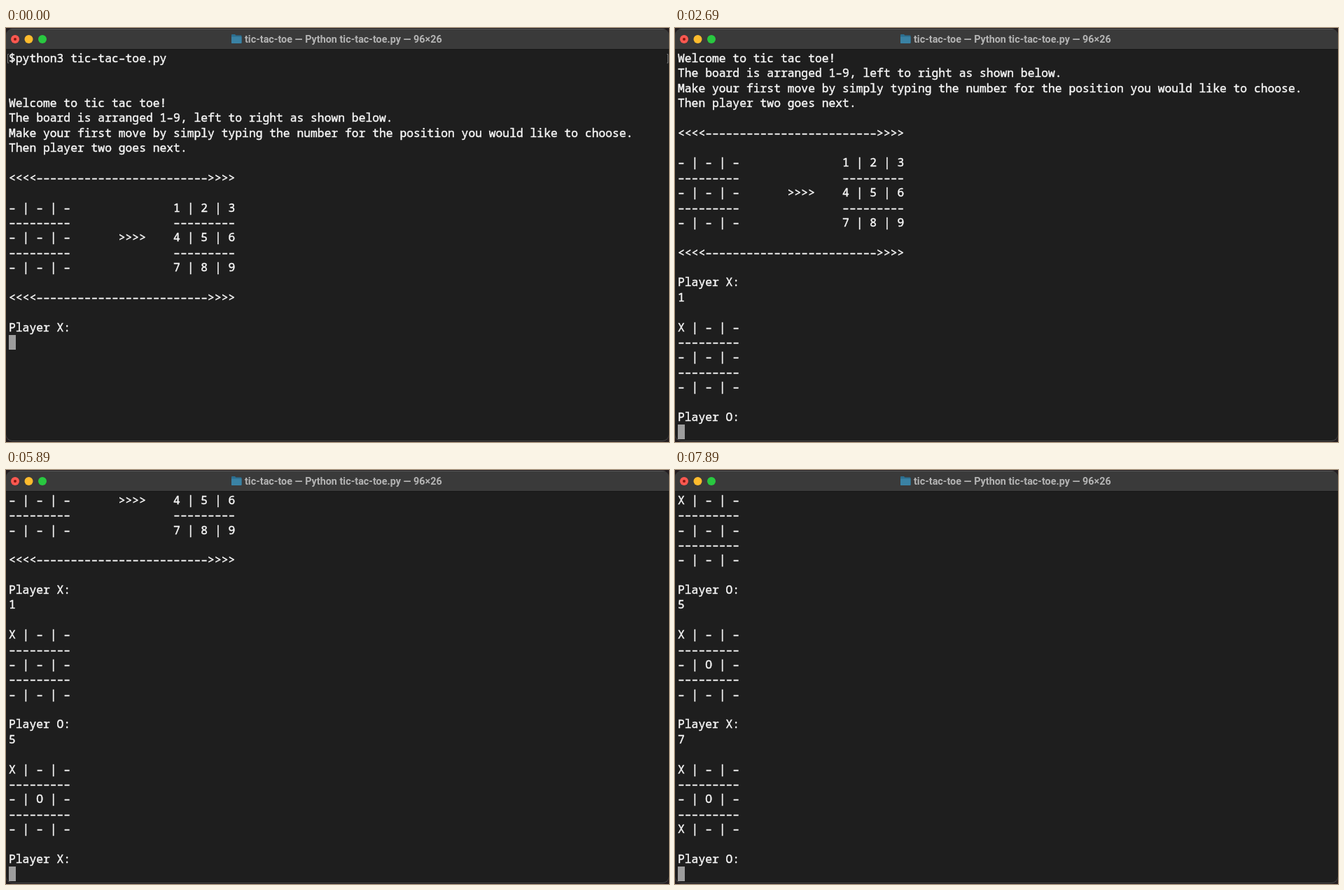
Animation, 947 px wide and 592 px high, one loop 8 s. Source, as an HTML page:

```html
<!DOCTYPE html>
<html lang="en">
<head>
<meta charset="utf-8">
<title>tic-tac-toe</title>
<style>
  html, body { margin: 0; width: 947px; height: 592px; overflow: hidden; background: #241d20; }
  #window {
    position: absolute; inset: 1px 0 1px; overflow: hidden;
    border-radius: 9px; background: #1e1e1e; box-shadow: inset 0 -1px #484848;
  }
  #bar { position: absolute; inset: 0 0 auto; height: 29px; background: #3a3a3a; box-shadow: inset 0 1px #585858; border-bottom: 1px solid #171717; }
  svg { position: absolute; left: 0; top: 0; }
  #title { font: 700 14.4px Roboto, Inter, sans-serif; fill: #b4b4b4; }
  #screen {
    position: absolute; left: 4px; top: 32.8px; margin: 0; color: #f6f6f6; white-space: pre;
    font: 500 16.34px/21.37px "Noto Sans Mono", "DejaVu Sans Mono", monospace;
    font-variant-ligatures: none; -webkit-text-stroke: .45px #f6f6f6;
  }
  #cursor { position: absolute; width: 10px; height: 21.4px; background: #9d9d9d; }
</style>
</head>
<body>
<div id="window"><div id="bar"></div></div>
<div id="cursor"></div>
<div id="screen"></div>
<svg width="947" height="592">
  <circle cx="13" cy="16" r="6" fill="#fc5850"/>
  <circle cx="13" cy="16" r="2" fill="#871710"/>
  <circle cx="32.5" cy="16" r="6" fill="#fdbb2d"/>
  <circle cx="52" cy="16" r="6" fill="#29c840"/>
  <path d="M322 10q0-1 1-1h4l1.5 1.5h7q1 0 1 1V21q0 1-1 1h-12.500q-1 0-1-1z" fill="#2c6e8f"/>
  <path d="M322 12.500h14.500V21q0 1-1 1h-12.500q-1 0-1-1z" fill="#3a82a4"/>
  <text id="title" x="341" y="20.500">tic-tac-toe — Python tic-tac-toe.py — 96×26</text>
  <path id="marks" d="M4 37.500H2.500V50H4M944 37.500H945.500V50H944" fill="none" stroke="#777"/>
</svg>
<script>
const LOOP = 8000, ROWS = 26, COL = 9.79, ROW = 21.37;
const el = id => document.getElementById(id);
const rule = '-'.repeat(9);
const board = cells => [0, 3, 6].map(i => [...cells.slice(i, i + 3)].join(' | '))
  .flatMap((line, i) => i ? [rule, line] : [line]);
const turn = (cells, player) => ['', ...board(cells), '', `Player ${player}:`];

const arrow = '<<<<' + '-'.repeat(25) + '>>>>';
const guide = board('123456789');
const opening = [
  '$python3 tic-tac-toe.py', '', '',
  'Welcome to tic tac toe!',
  'The board is arranged 1-9, left to right as shown below.',
  'Make your first move by simply typing the number for the position you would like to choose.',
  'Then player two goes next.', '', arrow, '',
  ...board('---------').map((line, i) => line + (i === 2 ? '>>>>' : '').padStart(11).padEnd(15) + guide[i]),
  '', arrow, '', 'Player X:'
];

// Each move: time typed, time entered, key, then the new turn
const moves = [
  [1690, 2690, '1', turn('X--------', 'O')],
  [3890, 4890, '5', turn('X---O----', 'X')],
  [6090, 7090, '7', turn('X---O-X--', 'O')]
];

function stateAt(t) {
  const lines = [...opening];
  let input = '';
  for (const [typed, entered, key, reply] of moves) {
    if (t >= entered) lines.push(key, ...reply);
    else if (t >= typed) input = key;
  }
  return { lines: [...lines, input], input };
}

let last = '';
function draw(t) {
  const { lines, input } = stateAt(t);
  // The wider dash matches the terminal's long hyphen
  const text = lines.slice(-ROWS).join('\n').replaceAll('-', '–');
  if (text === last) return;
  last = text;
  el('screen').textContent = text;
  el('cursor').style.left = 4 + input.length * COL + 'px';
  el('cursor').style.top = 32.8 + (Math.min(lines.length, ROWS) - 1) * ROW + 'px';
  el('marks').style.display = lines.length > ROWS ? 'none' : '';
}

const start = performance.now();
function tick() {
  draw((performance.now() - start) % LOOP);
  requestAnimationFrame(tick);
}
draw(0);
tick();
</script>
</body>
</html>
```
